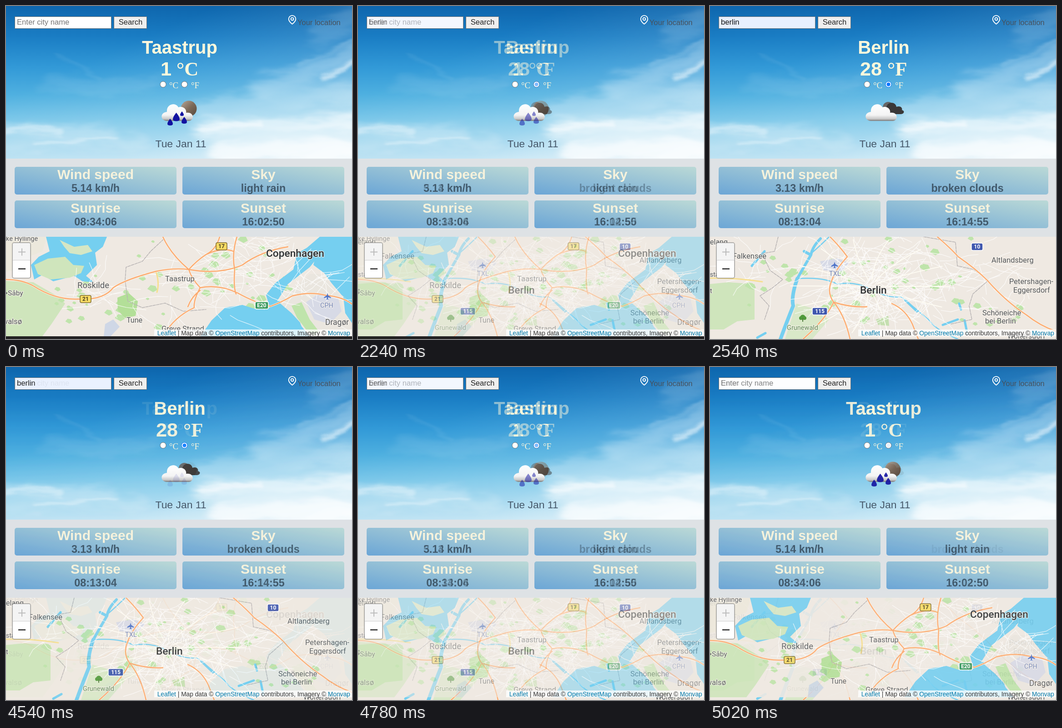
Animation, 761 px wide and 733 px high, one loop 5080 ms. Source, as an HTML page:

```html
<!DOCTYPE html>
<html lang="en">
<head>
<meta charset="utf-8">
<title>Weather</title>
<style>
html, body { margin: 0; width: 100%; height: 100%; overflow: hidden; background: #222; }
svg { display: block; font-family: "Liberation Sans", Arial, sans-serif; }
.serif { font-family: "Liberation Serif", "Times New Roman", serif; }
.map text { font-family: Roboto, "Open Sans", sans-serif; }
path { fill: none; stroke-linecap: round; stroke-linejoin: round; }
</style>
</head>
<body>
<svg id="stage" width="761" height="733" viewBox="0 0 761 733"></svg>
<script>
const CREAM = '#fff8dc', LABEL = '#55585c', WATER = '#75cff0', GREEN = '#bfe4ab', ROAD = '#fba96f';

let seed = 7;
const rnd = () => (seed = seed * 16807 % 2147483647) / 2147483647;
const spread = () => rnd() + rnd() - 1;

const text = (x, y, s, size, fill, more = '') =>
  `<text x="${x}" y="${y}" font-size="${size}" fill="${fill}" ${more}>${s}</text>`;
const mid = 'text-anchor="middle"', bold = 'font-weight="700"';
const rect = (x, y, w, h, fill, more = '') =>
  `<rect x="${x}" y="${y}" width="${w}" height="${h}" fill="${fill}" ${more}/>`;
const area = (d, fill, more = '') => `<path d="${d}" style="fill:${fill}" ${more}/>`;
const line = (d, color, w, more = '') => `<path d="${d}" stroke="${color}" stroke-width="${w}" ${more}/>`;
const circle = (x, y, r, fill, more = '') => `<circle cx="${x}" cy="${y}" r="${r}" fill="${fill}" ${more}/>`;

// Sky, panel and cards
const cloud = ([d, w, o]) => line(d, '#fff', w, `opacity="${o}"`);
const softClouds = [
  ['M90 170Q250 190 330 165', 24, .12], ['M560 180Q680 145 780 95', 40, .3],
  ['M430 235Q600 205 780 190', 50, .28], ['M-20 276H230', 18, .4],
  ['M470 325Q600 305 780 320', 50, .75], ['M430 275Q560 262 780 258', 34, .65],
  ['M690 60Q740 30 790 20', 50, .15], ['M-20 310Q150 300 300 300', 20, .25]
];
const fineClouds = [
  ['M700 157Q735 147 765 120', 11, .55], ['M0 276Q60 268 125 277', 6, .55],
  ['M60 306Q150 293 240 290', 5, .5], ['M425 272Q480 258 560 262', 9, .6],
  ['M640 130Q700 105 765 75', 6, .2], ['M110 105Q150 125 205 160', 8, .08]
];
const cards = [[19, 354], [388, 354], [19, 428], [388, 428]];
const base = rect(0, 0, 761, 336, 'url(#sky)') + rect(0, 0, 761, 336, 'url(#glow)') +
  `<g filter="url(#soft)">${softClouds.map(cloud).join('')}</g>` +
  `<g filter="url(#fine)">${fineClouds.map(cloud).join('')}</g>` +
  rect(0, 336, 761, 172, '#dee2e5') +
  cards.map(([x, y]) => rect(x, y, 356, 61, 'url(#card)', 'rx="5"')).join('');

// Weather icons
const drop = (x, y, s) =>
  area(`M${x} ${y - 1.5 * s}Q${x + 2 * s} ${y + s} ${x} ${y + s}Q${x - 2 * s} ${y + s} ${x} ${y - 1.5 * s}`, '#1212a0');
const whiteCloud = area('M354 253C338 252 339 234 354 233C352 215 374 211 379 223C389 219 398 227 396 235C414 232 415 252 402 253Z', 'url(#puff)');
const rainIcon = circle(402, 226, 17.5, 'url(#moon)') + whiteCloud +
  drop(361, 257, 6) + drop(374.5, 246, 7.5) + drop(387, 238, 4) + drop(392, 253, 6);
const cloudIcon = circle(392, 223, 12, '#666') +
  area('M386 238C374 236 378 222 388 223C390 210 408 210 410 222C420 218 424 226 422 229C430 231 426 238 420 238Z', '#3a3838') + whiteCloud;

// Map parts
const street = (cx, cy, sx, sy) => {
  let x = cx + spread() * sx, y = cy + spread() * sy, a = rnd() * 6.3, d = `M${x | 0} ${y | 0}`;
  for (let i = 0; i < 4; i++) {
    a += spread() * .6;
    d += `l${(Math.cos(a) * 22).toFixed(1)} ${(Math.sin(a) * 16).toFixed(1)}`;
  }
  return d;
};
const streets = (n, ...box) => line(Array.from({ length: n }, () => street(...box)).join(''), '#fff', 1.2, 'opacity=".8"');
const parks = (n, cx, cy, sx, sy, color = GREEN, r = 8) => Array.from({ length: n }, () => {
  const x = cx + spread() * sx, y = cy + spread() * sy, s = r * (.4 + rnd());
  return area(`M${x - s} ${y}l${s * .7} ${-s * .8}l${s} ${s * .2}l${s * .4} ${s * .8}l${-s * .9} ${s * .5}Z`, color);
}).join('');
const roads = d => line(d, '#fff3e2', 4) + line(d, ROAD, 2.4);
const border = d => line(d, '#b8b4b4', 1.5, 'stroke-dasharray="6 2"');
const place = (x, y, s, size = 16.5, fill = LABEL, more = '') =>
  text(x, y, s, size, fill, `stroke="#f6f1ea" stroke-width="2.5" stroke-opacity=".8" paint-order="stroke" ${more}`);
const shield = (x, y, w, s, fill, ink, edge) => rect(x, y, w, 16, fill, `rx="3" stroke="${edge}" stroke-width="1.5"`) +
  text(x + w / 2, y + 12.3, s, 12, ink, `${mid} ${bold}`);
const plane = (x, y) => area(`M${x} ${y - 7}l1.5 5l6 4v2l-6 -2l-.5 3l2 2h-6l2 -2l-.5 -3l-6 2v-2l6 -4Z`, '#4f74c8');

const mapA = rect(0, 508, 761, 219, '#efe9e2') +
  area('M0 605L60 608L115 640L130 655L100 700L80 727H0Z', '#cfe5bc') +
  area('M0 508H90L80 540L55 550V575L0 585Z', '#ece8dc') +
  parks(22, 190, 650, 180, 75) + parks(36, 480, 600, 190, 100) + parks(12, 650, 650, 60, 60) +
  area('M245 642L270 632L290 650L285 682L262 687L246 670Z', '#b3df98') +
  area('M88 508H222L213 530L196 543L200 570L176 594L193 608L168 606L150 594L104 606L80 592L62 602L55 570L72 552L96 540Z', WATER) +
  area('M62 570L92 556L130 552L148 570L172 572L165 588L140 598L98 602L70 590Z', '#cfe5bc') +
  area('M118 515L150 530L180 526L190 540L165 548L140 544L128 530Z', '#d5e6c4') +
  area('M690 508H761V655L738 636L716 610L700 588L676 570L684 540Z', WATER) +
  area('M640 545L662 532L690 508H705L688 550L668 575L620 612L596 650L618 645L640 680L650 705L668 727H428L452 692L482 664L520 658L552 668L580 664L572 636L592 610L632 580Z', WATER) +
  area('M600 652L630 624L668 590L694 590L714 612L736 640L742 672L761 700V727H668L650 700L628 676Z', '#eae6df') +
  area('M660 652L690 632L730 640L738 672L712 700L678 690Z', '#d7dae6') +
  area('M628 660L650 652L668 690L688 716L680 727L660 712L640 686Z', GREEN) +
  area('M742 640L761 655V698L746 676Z', WATER) +
  area('M218 700L236 690L250 706L230 727H215Z', '#cfd7e6') +
  line('M690 525L672 560L640 588L606 622', WATER, 5) +
  streets(55, 570, 565, 150, 75) + streets(35, 420, 640, 160, 90) + streets(14, 190, 630, 60, 40) + streets(14, 670, 640, 60, 50) +
  border('M347 513L318 540L300 562L264 575L262 604L268 650L300 664L350 654L390 672L440 668') +
  line('M330 585Q338 610 332 630', '#f6df91', 3) +
  roads('M0 602Q35 602 60 616Q110 648 160 645Q214 648 236 620Q262 602 330 584Q370 576 402 580Q420 560 440 547Q462 536 470 508' +
    'M345 508Q362 546 402 580Q408 600 427 620Q412 648 414 664Q370 684 345 727' +
    'M402 580Q470 592 520 570Q560 540 620 530M427 620Q470 612 510 632Q550 654 582 661Q606 652 630 638Q670 628 704 637Q740 640 761 656' +
    'M508 508Q496 546 503 580Q500 620 506 634M427 626Q408 640 400 662M440 547Q476 530 500 540') +
  plane(707, 639) +
  place(0, 517, 'ke Hyllinge', 14.5) + place(157, 621, 'Roskilde', 18.5) + place(350, 606, 'Taastrup') +
  place(572, 552, 'Copenhagen', 22.7, '#2d3033', 'font-weight="500"') + place(265, 697, 'Tune', 16) +
  place(342, 716, 'Greve Strand') + place(702, 702, 'Dragør', 17.5) + place(691, 664, 'CPH', 14.5, '#6f83b8') +
  place(35, 700, 'valsø', 16.5, LABEL, 'text-anchor="end"') + place(4, 637, 'Såby', 15.5) + circle(1, 632, 2, '#777') +
  shield(462, 521, 24, '17', '#f7da62', '#4b4222', '#7d6b2e') + shield(163, 637, 24, '21', '#f7da62', '#4b4222', '#7d6b2e') +
  shield(548, 651, 29, 'E20', '#3c9a5f', '#fff', '#fff');

const mapB = rect(0, 508, 761, 225, '#efe9e2') +
  area('M0 612L40 608L98 612V690L60 694L30 712H0Z', '#cfe5bc') +
  area('M190 655L225 665L262 690L225 733H165Z', '#d9e8c8') +
  parks(16, 180, 600, 150, 100) + parks(38, 410, 610, 200, 110) + parks(8, 640, 690, 120, 40) +
  area('M242 562L280 555L306 566L290 584L250 582Z', '#d7dae6') +
  area('M365 690L392 682L394 704L370 702Z', '#c5dfb0') +
  line('M243 512Q225 530 222 548L207 540M222 548Q206 575 192 600', WATER, 6) +
  line('M192 600Q178 640 183 660Q170 692 155 733', WATER, 8) +
  line('M262 508Q240 530 222 545M192 600Q250 596 280 612Q320 606 350 622Q390 644 420 640Q450 664 480 690Q500 716 545 733', WATER, 2.5) +
  line('M430 648L455 672M512 702L545 690M548 655L552 668M120 540L92 572M104 730L122 720M560 692L566 722', WATER, 5) +
  streets(170, 370, 615, 185, 115) + streets(24, 600, 600, 150, 100) + streets(14, 80, 570, 90, 60) +
  Array.from({ length: 14 }, (_, i) => {
    const a = i * .45, x = Math.cos(a), y = Math.sin(a);
    return line(`M${352 + 18 * x} ${617 + 14 * y}Q${352 + 80 * x + 12 * y} ${617 + 60 * y} ${352 + 175 * x} ${617 + 105 * y}`, '#fffdf4', 1.8);
  }).join('') +
  border('M150 508L142 540L115 545L132 582L160 602L138 620L110 638L130 660L120 690') +
  border('M470 508L540 520L544 572L580 580L612 604L578 634L570 660L576 690L530 700') +
  line('M0 599Q60 598 115 607', '#f6df91', 3) +
  roads('M264 508Q286 530 302 552Q276 580 268 604Q256 630 272 652Q296 680 308 733M272 652Q310 664 345 662' +
    'M272 652Q254 690 205 733M500 508Q530 534 546 552Q584 578 610 604Q650 650 696 680Q726 704 761 716' +
    'M400 655Q430 668 445 700L458 733') +
  plane(274, 570) + circle(204, 685, 5.5, '#4f9a3a') + circle(200, 687, 4, '#4f9a3a') + circle(208, 687, 4, '#4f9a3a') + rect(203, 688, 2, 7, '#4f7a3a') +
  place(0, 525, 'elang', 16) + place(50, 556, 'Falkensee') + place(262, 594, 'TXL', 14.5, '#6f83b8') +
  place(330, 633, 'Berlin', 22.7, '#2d3033', 'font-weight="500"') + place(619, 565, 'Altlandsberg') +
  place(658, 612, 'Petershagen-') + place(667, 631, 'Eggersdorf') + place(599, 681, 'Schöneiche') +
  place(605, 699, 'bei Berlin') + place(169, 713, 'Grunewald', 14.5, '#5f8a55') + place(654, 732, 'Woltersdorf', 16) +
  place(0, 596, 'sta', 14) + place(0, 632, 't', 15) +
  shield(575, 522, 25, '10', '#3f57ae', '#fff', '#fff') + shield(225, 664, 33, '115', '#3f57ae', '#fff', '#fff');

// One complete page state
const page = p => rect(19.5, 23.5, 212, 26, p.field, 'stroke="#767676"') +
  text(24, 41, p.entry, 16.6, p.ink) +
  text(382, 105, p.city, 40, CREAM, `${mid} ${bold}`) +
  text(p.x, 153, p.temp, 43, CREAM, bold) +
  text(p.unitX, 153, p.unit, 43, CREAM, `${bold} class="serif"`) +
  circle(392.5, 172.5, 6.5, '#fff', `stroke="${p.on ? '#0075ff' : '#767676'}"`) +
  (p.on ? circle(392.5, 172.5, 4, '#0075ff') : '') +
  `<g filter="url(#smooth)">${p.icon}</g>` +
  p.values.map((v, i) => text(cards[i][0] + 178, cards[i][1] + 55, v, 23.3, '#425a6c', `${mid} ${bold}`)).join('') +
  `<g class="map" clip-path="url(#land)">${p.map}</g>`;

const first = page({ field: '#fff', entry: 'Enter city name', ink: '#757575', city: 'Taastrup', temp: '1', x: 340,
  unit: '°C', unitX: 375, icon: rainIcon, values: ['5.14 km/h', 'light rain', '08:34:06', '16:02:50'], map: mapA });
const second = page({ field: '#e8f0fe', entry: 'berlin', ink: '#111', city: 'Berlin', temp: '28', x: 330, on: true,
  unit: '°F', unitX: 390, icon: cloudIcon, values: ['3.13 km/h', 'broken clouds', '08:13:04', '16:14:55'], map: mapB });

// Parts that never change
const link = s => `<tspan fill="#0078a8">${s}</tspan>`;
const fixed = rect(237.5, 23.5, 72, 26, '#efefef', 'stroke="#767676"') +
  text(274, 41, 'Search', 16.6, '#222', mid) +
  `<g transform="translate(619.2 20) scale(.86)" stroke="#fff" stroke-width="2.2" fill="none">
    <path d="M21 10c0 7-9 13-9 13s-9-6-9-13a9 9 0 0 1 18 0z"/><circle cx="12" cy="10" r="3.4"/></g>` +
  text(641, 42, 'Your location', 16.5, '#46505c') +
  circle(345.5, 172.5, 6.5, '#fff', 'stroke="#767676"') +
  text(359, 180.5, '°C', 19, CREAM, 'class="serif"') + text(407, 180.5, '°F', 19, CREAM, 'class="serif"') +
  text(384.5, 310.5, 'Tue Jan 11', 22.9, '#46586a', mid) +
  ['Wind speed', 'Sky', 'Sunrise', 'Sunset'].map((s, i) =>
    text(cards[i][0] + 178, cards[i][1] + 26.5, s, 30, '#f5f2dc', `${mid} ${bold}`)).join('') +
  rect(14, 521, 40, 78, '#fff', 'rx="4" stroke="#000" stroke-opacity=".28" stroke-width="2"') +
  rect(15, 522, 38, 37, '#f4f4f4', 'rx="3"') + rect(15, 559, 38, 1, '#ccc') +
  rect(27, 540.5, 16, 2, '#bbb') + rect(34, 533.5, 2, 16, '#bbb') + rect(27, 577.5, 16, 2.2, '#111') +
  rect(326, 712, 435, 15, '#fff', 'opacity=".75"') +
  text(757, 725, `${link('Leaflet')} | Map data © ${link('OpenStreetMap')} contributors, Imagery © ${link('Monvap')}`,
    13.75, '#333', 'text-anchor="end"');

const stops = list => list.map(([o, c, a = 1]) => `<stop offset="${o}" stop-color="${c}" stop-opacity="${a}"/>`).join('');
const gradient = (id, x1, y1, x2, y2, list) =>
  `<linearGradient id="${id}" x1="${x1}" y1="${y1}" x2="${x2}" y2="${y2}">${stops(list)}</linearGradient>`;
const haze = (id, blur, scale) => `<filter id="${id}" filterUnits="userSpaceOnUse" x="-40" y="-40" width="841" height="440"
  color-interpolation-filters="sRGB"><feGaussianBlur stdDeviation="${blur}" result="b"/>
  <feTurbulence type="fractalNoise" baseFrequency=".012 .04" numOctaves="3" seed="4" result="n"/>
  <feDisplacementMap in="b" in2="n" scale="${scale}" xChannelSelector="R" yChannelSelector="G"/></filter>`;
const clip = (id, y, h) => `<clipPath id="${id}">${rect(0, y, 761, h, '#000')}</clipPath>`;

stage.innerHTML = `<defs>
  ${gradient('sky', 0, 0, 0, 1, [[0, '#0e66ad'], [.2, '#1a7dc4'], [.4, '#3299d7'], [.58, '#4fb0e0'], [.75, '#7ac7e9'], [1, '#b8e0f2']])}
  ${gradient('glow', .3, .3, 1, 1, [[0, '#fff', 0], [.5, '#fff', .15], [1, '#fff', .75]])}
  ${gradient('card', 0, 1, 1, 0, [[0, '#6ca6d6'], [1, '#bbd9d6']])}
  ${gradient('puff', 0, 0, 0, 1, [[0, '#fff'], [.65, '#f4f4f4'], [.88, '#c8c8c8'], [1, '#777']])}
  ${gradient('moon', 0, 0, 1, 1, [[0, '#b8a898'], [.5, '#7d6a59'], [1, '#55483d']])}
  ${haze('soft', 10, 36)}${haze('fine', 3.5, 24)}
  <filter id="smooth"><feGaussianBlur stdDeviation=".7"/></filter>
  ${clip('land', 508, 225)}${clip('short', 0, 727)}
</defs>
<g><g id="base">${base}</g>${second}</g>
<g id="front" clip-path="url(#short)"><use href="#base"/>${first}</g>
${fixed}${rect(0, 727, 761, 6, '#222122', 'id="strip"')}`;

const front = document.getElementById('front'), strip = document.getElementById('strip');
const step = ms => Math.min(10, Math.max(0, Math.floor(ms / 60) + 1)) / 10;

function draw() {
  const t = performance.now() % 5080;
  front.style.opacity = t < 2540 ? 1 - step(t - 2000) : step(t - 4540);
  strip.style.opacity = t < 2540 ? 1 : 0;
  requestAnimationFrame(draw);
}
draw();
</script>
</body>
</html>
```
